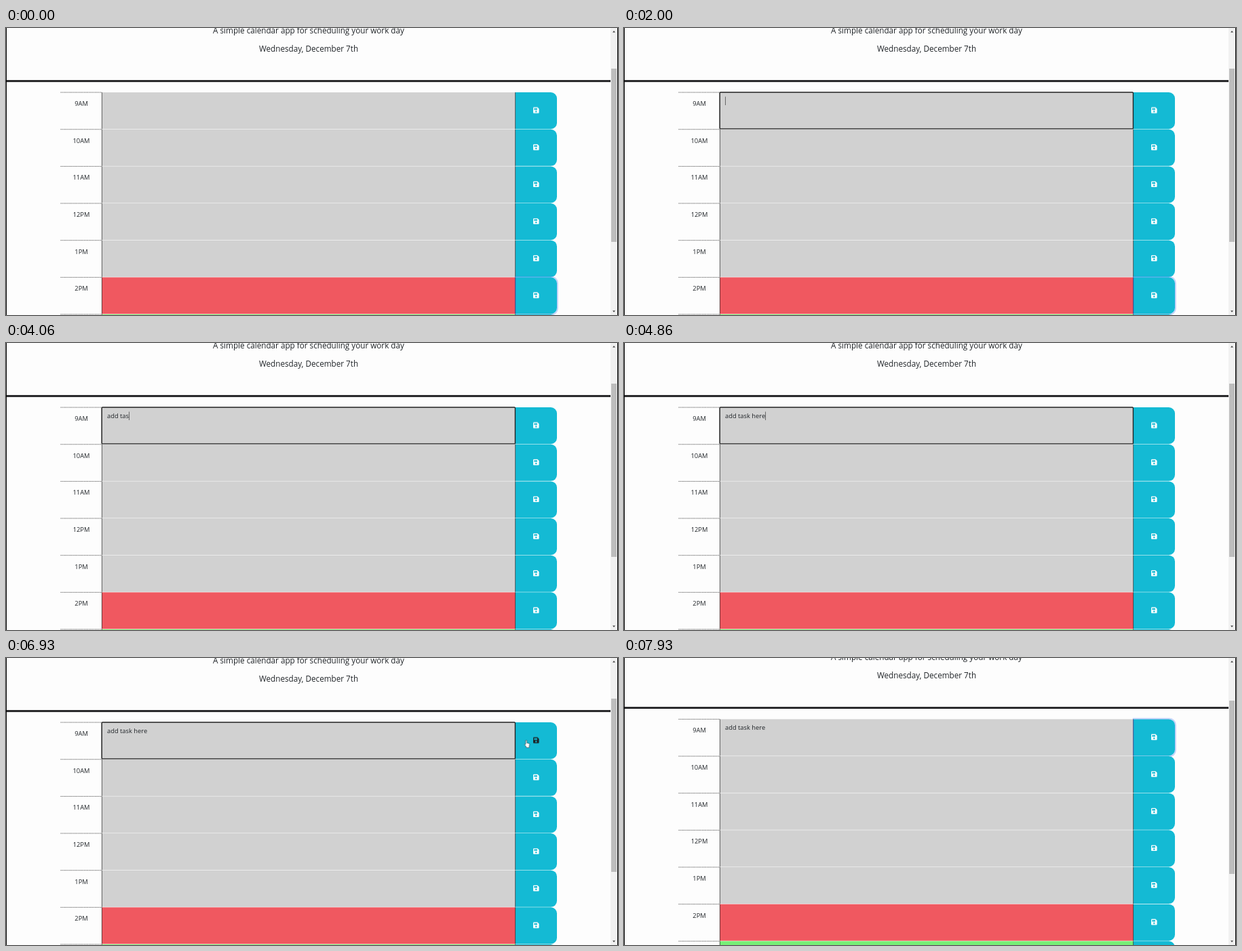
Recreate the animation shown at these times as an HTML page. Size 902x424 px, loop 8000 ms.

```html
<!DOCTYPE html>
<html lang="en">
<head>
<meta charset="utf-8">
<title>Work day scheduler</title>
<style>
  html, body { margin: 0; width: 100%; height: 100%; overflow: hidden; background: #fdfdfd; }
  svg { display: block; width: 100vw; height: 100vh; }
  text { font: 9.35px "Open Sans", sans-serif; fill: #212529; white-space: pre; }
  .mid { text-anchor: middle; }
  .lead { font-size: 11.7px; }
  .past { fill: #d1d1d1; }
  .present { fill: #f05860; }
  .future { fill: #77ef77; }
  .save { fill: #14bad4; }
  .icon { fill: #fdfdfd; }
  .glow { fill: none; stroke: #3a6ff0; stroke-opacity: .3; stroke-width: 1.9; opacity: 0; }
  .edge { stroke: #2b2b2b; stroke-width: .7; }
  .dots { stroke: #222; stroke-width: .7; stroke-dasharray: 1.4 .9; }

  #page, #thumb, #focus, #hand, .glow, .icon { animation: 8s linear infinite; }
  #page { animation-name: scroll; animation-timing-function: step-end; }
  #thumb { animation-name: thumb; animation-timing-function: step-end; }
  #focus { animation-name: focus; animation-timing-function: step-end; opacity: 0; }
  #hand { animation-name: hand; opacity: 0; }
  #row0 .icon { animation-name: hover; animation-timing-function: step-end; }
  #row0 .glow { animation-name: glowIn; }
  #row5 .glow { animation-name: glowOut; }

  @keyframes scroll { 0% { transform: none } 99.1%, 100% { transform: translateY(-4.7px) } }
  @keyframes thumb { 0% { transform: none } 99.1%, 100% { transform: translateY(3px) } }
  @keyframes focus { 0% { opacity: 0 } 24.9% { opacity: 1 } 92.5%, 100% { opacity: 0 } }
  @keyframes hover { 0% { fill: #fdfdfd } 85% { fill: #1d2528 } 95%, 100% { fill: #fdfdfd } }
  @keyframes glowOut { 0%, 25.2% { opacity: 1 } 27.2%, 100% { opacity: 0 } }
  @keyframes glowIn { 0%, 92.5% { opacity: 0 } 94.4%, 100% { opacity: 1 } }
  @keyframes hand {
    0%, 84.99% { opacity: 0; transform: translate(755px, 128px) }
    85% { opacity: 1; transform: translate(755px, 128px) }
    86.6% { opacity: 1; transform: translate(767.5px, 127px) }
    89.1%, 94% { opacity: 1; transform: translate(777px, 125px) }
    95% { opacity: 1; transform: translate(786px, 126px) }
    95.01%, 100% { opacity: 0; transform: translate(786px, 126px) }
  }
</style>
</head>
<body>
<svg viewBox="0 0 902 424" preserveAspectRatio="none">
  <rect width="902" height="424" fill="#fdfdfd"/>
  <g id="page">
    <text class="mid lead" x="446" y="7.6">A simple calendar app for scheduling your work day</text>
    <text class="mid lead" x="446" y="34.5">Wednesday, December 7th</text>
    <rect x="1" y="76.9" width="890" height="2.9" fill="#1f1f21"/>
    <g id="rows"></g>
    <rect id="focus" x="141.1" y="95" width="609.3" height="53.9" rx="1.2" fill="none" stroke="#202020" stroke-width="1.3"/>
    <text id="typed" x="149" y="110.8"></text>
    <rect id="caret" y="101.5" width=".6" height="12.5" fill="#222"/>
  </g>
  <path id="hand" d="M-1.8-5.2q1-.9 1.8 0v3.7l3 .7q1.2.4 1 1.6l-.6 2.9v1.7h-4.4v-1.3l-2.3-3q-.3-1.2 1.5-.6z" fill="#fff" stroke="#25373b" stroke-width=".6"/>
  <rect x="891" width="10" height="424" fill="#f1f1f1"/>
  <rect id="thumb" x="892" y="60" width="8" height="256" fill="#bdbdbd"/>
  <path d="M894 6.5h4l-2-2.4zM894 417.5h4l-2 2.4z" fill="#444"/>
  <path d="M.5 0v424M901.5 0v424" stroke="#000"/>
</svg>
<script>
  const LOOP = 8000, PITCH = 54.65, TOP = 94.6;
  const MESSAGE = "add task here";
  const KEY_TIMES = [2855, 3195, 3325, 3595, 3855, 3925, 4055, 4195, 4325, 4455, 4595, 4725, 4855];
  const CARET_SPANS = [[1990, 2400], [2855, 5330], [6060, 6600], [7130, 7400]];
  const $ = id => document.getElementById(id);

  const buttonShape = grow =>
    `M750.8 ${.5 - grow}h${52.2 + grow}a9 9 0 0 1 9 9v${36.1 + 2 * grow}a9 9 0 0 1-9 9h-${52.2 + grow}z`;

  function row(label, i) {
    const kind = i < 5 ? "past" : i === 5 ? "present" : "future";
    return `<g id="row${i}" transform="translate(0 ${TOP + PITCH * i})">
      <path class="dots" d="M80.5 .5H141"/>
      <text class="mid" x="111" y="20.6">${label}</text>
      <rect class="${kind}" x="141" y=".5" width="610" height="54.1"/>
      <path class="save" d="${buttonShape(0)}"/>
      <path class="edge" d="M141.4 .5v54.1M750.6 .5v54.1"/>
      <path class="glow" d="${buttonShape(.8)}"/>
      <path class="icon" fill-rule="evenodd" d="M778 22.6h5.4l2.2 2.2v5.4q0 1-1 1h-6.6q-1 0-1-1v-6.6q0-1 1-1zM778.3 23.9v2.4h4.7v-2.4zM781.3 27.4a1.25 1.25 0 1 0 .01 0z"/>
    </g>`;
  }

  $("rows").innerHTML = ["9AM", "10AM", "11AM", "12PM", "1PM", "2PM", "3PM"].map(row).join("");

  function draw() {
    const t = performance.now() % LOOP;
    const typed = $("typed"), caret = $("caret");
    const text = MESSAGE.slice(0, KEY_TIMES.filter(k => k <= t).length);
    if (typed.textContent !== text) typed.textContent = text;
    caret.setAttribute("x", 149.2 + (text ? typed.getComputedTextLength() : 0));
    caret.setAttribute("opacity", CARET_SPANS.some(([on, off]) => t >= on && t < off) ? 1 : 0);
    requestAnimationFrame(draw);
  }
  draw();
</script>
</body>
</html>
```
